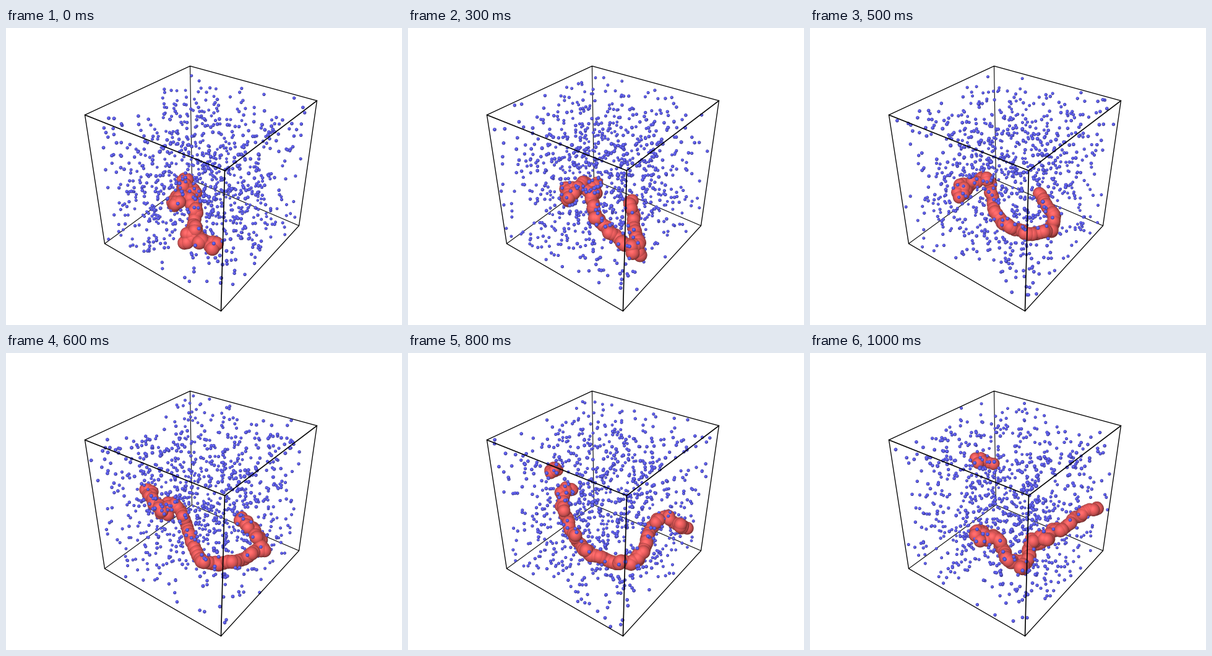
These frames come from a looping animation (640 by 480 pixels, 1100 ms). A matplotlib script:

```python
import itertools

import matplotlib.pyplot as plt
import numpy as np
from matplotlib.animation import FuncAnimation

W, H, SS = 640, 480, 3
FRAMES, STEP = 11, 100
N_FLUID, N_CHAIN = 930, 92
R_FLUID, R_BEAD = 0.0107, 0.043
BLUE, RED = np.array([0.4, 0.4, 1.0]), np.array([1.0, 0.4, 0.4])
LIGHT = np.array([-0.16, -0.2, 0.966])

# Screen position of each unit-cube corner (x, y, z)
CORNERS = {
    (0, 0, 0): (300, 245), (1, 0, 0): (473, 319),
    (0, 1, 0): (159, 348), (1, 1, 0): (347, 457),
    (0, 0, 1): (297, 61), (1, 0, 1): (502, 117),
    (0, 1, 1): (127, 140), (1, 1, 1): (353, 230),
}

# Key points of the backbone, one row for every second frame
BACKBONE = np.array([
    [(294, 240), (276, 278), (303, 264), (304, 306), (298, 338), (338, 352)],
    [(268, 240), (262, 268), (300, 262), (308, 318), (364, 374), (338, 280)],
    [(268, 290), (246, 268), (292, 240), (304, 294), (372, 340), (374, 274)],
    [(228, 220), (248, 257), (274, 242), (324, 338), (412, 316), (384, 270)],
    [(262, 210), (248, 244), (292, 322), (368, 334), (398, 270), (449, 278)],
    [(270, 296), (292, 290), (334, 344), (364, 304), (405, 284), (461, 245)],
], float)
WRAP = 8  # from here one end of the chain crosses the periodic boundary


def fit_camera():
    """Projection matrix from the corners, scaled so w is true depth."""
    rows = []
    for p, (u, v) in CORNERS.items():
        q, o = np.array([*p, 1.0]), np.zeros(4)
        rows += [np.r_[q, o, -u / W * q], np.r_[o, q, -v / W * q]]
    cam = np.linalg.svd(np.array(rows))[2][-1].reshape(3, 4)
    cam[:2] *= W
    cam /= np.linalg.norm(cam[2, :3])
    return cam * np.sign(cam[2] @ [0.5, 0.5, 0.5, 1])


CAM = fit_camera()
FOCAL = np.linalg.norm(np.cross(CAM[0, :3], CAM[2, :3]))
DEPTHS = [CAM[2] @ [*p, 1] for p in CORNERS]
NEAR, FAR = min(DEPTHS), max(DEPTHS)


def fluid(rng):
    pts = np.c_[rng.random((N_FLUID, 3)), np.ones(N_FLUID)]
    u, v, w = CAM @ pts.T
    return np.c_[u / w, v / w, w]


def spline(nodes, n):
    """Catmull-Rom curve through the nodes, n points."""
    p = np.vstack([nodes[:1], nodes, nodes[-1:]])
    s = np.linspace(0, len(nodes) - 1 - 1e-9, n)
    k = s.astype(int)
    t = (s - k)[:, None]
    a, b, c, d = p[k], p[k + 1], p[k + 2], p[k + 3]
    return b + 0.5 * t * (c - a + t * (2 * a - 5 * b + 4 * c - d
                                       + t * (3 * (b - c) + d - a)))


def coil(path, rng):
    """Crumple a path, most where its beads lie close together."""
    gap = np.linalg.norm(np.gradient(path, axis=0), axis=1)
    size = np.clip(8.5 - 1.7 * gap, 1.8, 6.5)
    noise = rng.normal(size=(len(path) + 2, 3))
    noise = (noise[:-2] + 2 * noise[1:-1] + noise[2:]) / 6**0.5
    noise = np.clip(noise, -1.7, 1.7)
    xy = path + noise[:, :2] * size[:, None]
    far = np.interp(xy[:, 1], (160, 360), (0.72, 0.34))
    w = NEAR + (FAR - NEAR) * far + 0.03 * noise[:, 2]
    return np.c_[xy, w]


def chain(i, rng):
    k, t = divmod(i / 2, 1)
    k = int(k)
    nodes = BACKBONE[k]
    if t:
        nodes = (1 - t) * nodes + t * BACKBONE[k + 1]
    beads = coil(spline(nodes, N_CHAIN), rng)
    if i < WRAP:
        return beads
    t = (i - WRAP) / (FRAMES - 1 - WRAP)
    mid = np.array([235 + 48 * t, 189 - 18 * t])
    reach = np.array([3 + 22 * t**0.5, 4 * (1 - t)])
    ends = np.array([mid - reach / 2, mid + reach / 2])
    return np.vstack([beads, coil(spline(ends, 10), rng)])


def splat(rgb, zbuf, ball, radius, color):
    """Shade one sphere into the depth-tested buffer."""
    x, y, w = ball
    x, y, r = (x + 0.5) * SS, (y + 0.5) * SS, radius * FOCAL / w * SS
    x0, x1 = max(int(x - r), 0), min(int(x + r) + 2, W * SS)
    y0, y1 = max(int(y - r), 0), min(int(y + r) + 2, H * SS)
    nx = (np.arange(x0, x1) + 0.5 - x)[None, :] / r
    ny = (np.arange(y0, y1) + 0.5 - y)[:, None] / r
    d2 = nx**2 + ny**2
    nz = np.sqrt(np.clip(1 - d2, 0, 1))
    z = w - radius * nz
    part = zbuf[y0:y1, x0:x1]
    hit = (d2 <= 1) & (z < part)
    lit = np.clip(nx * LIGHT[0] + ny * LIGHT[1] + nz * LIGHT[2], 0, 1)
    shade = (0.42 + 0.56 * lit)[..., None] * color
    shade = shade + 0.05 * lit[..., None]**18
    part[hit] = z[hit]
    rgb[y0:y1, x0:x1][hit] = np.clip(shade[hit], 0, 1)


def render(i):
    rng = np.random.default_rng(70 + i)
    rgb = np.zeros((H * SS, W * SS, 3), np.float32)
    zbuf = np.full((H * SS, W * SS), np.inf)
    for ball in chain(i, rng):
        splat(rgb, zbuf, ball, R_BEAD, RED)
    for ball in fluid(rng):
        splat(rgb, zbuf, ball, R_FLUID, BLUE)
    shape = (H, SS, W, SS)
    alpha = np.isfinite(zbuf).reshape(shape).mean((1, 3))[..., None]
    color = rgb.reshape(*shape, 3).mean((1, 3)) / np.maximum(alpha, 1e-6)
    return np.clip(np.dstack([color, alpha]), 0, 1)


fig = plt.figure(figsize=(W / 100, H / 100), dpi=100, facecolor="white")
ax = fig.add_axes([0, 0, 1, 1])
ax.axis("off")

for a, b in itertools.combinations(CORNERS, 2):
    if sum(p != q for p, q in zip(a, b)) != 1:
        continue
    hidden = (0, 0, 0) in (a, b)
    front = (1, 1, 1) in (a, b)
    ends = np.array([CORNERS[a], CORNERS[b]]) + 0.5
    ax.plot(*ends.T, color="black", solid_capstyle="round",
            lw=0.8 if hidden else 1.2 if front else 0.95,
            zorder=1 if hidden else 3)

img = ax.imshow(np.zeros((H, W, 4)), extent=(0, W, H, 0), zorder=2,
                interpolation="nearest", aspect="auto")
ax.set_xlim(0, W)
ax.set_ylim(H, 0)


def update(i):
    img.set_data(render(i))
    return (img,)


anim = FuncAnimation(fig, update, frames=FRAMES, interval=STEP,
                     repeat=True, repeat_delay=0)
plt.show()
```
